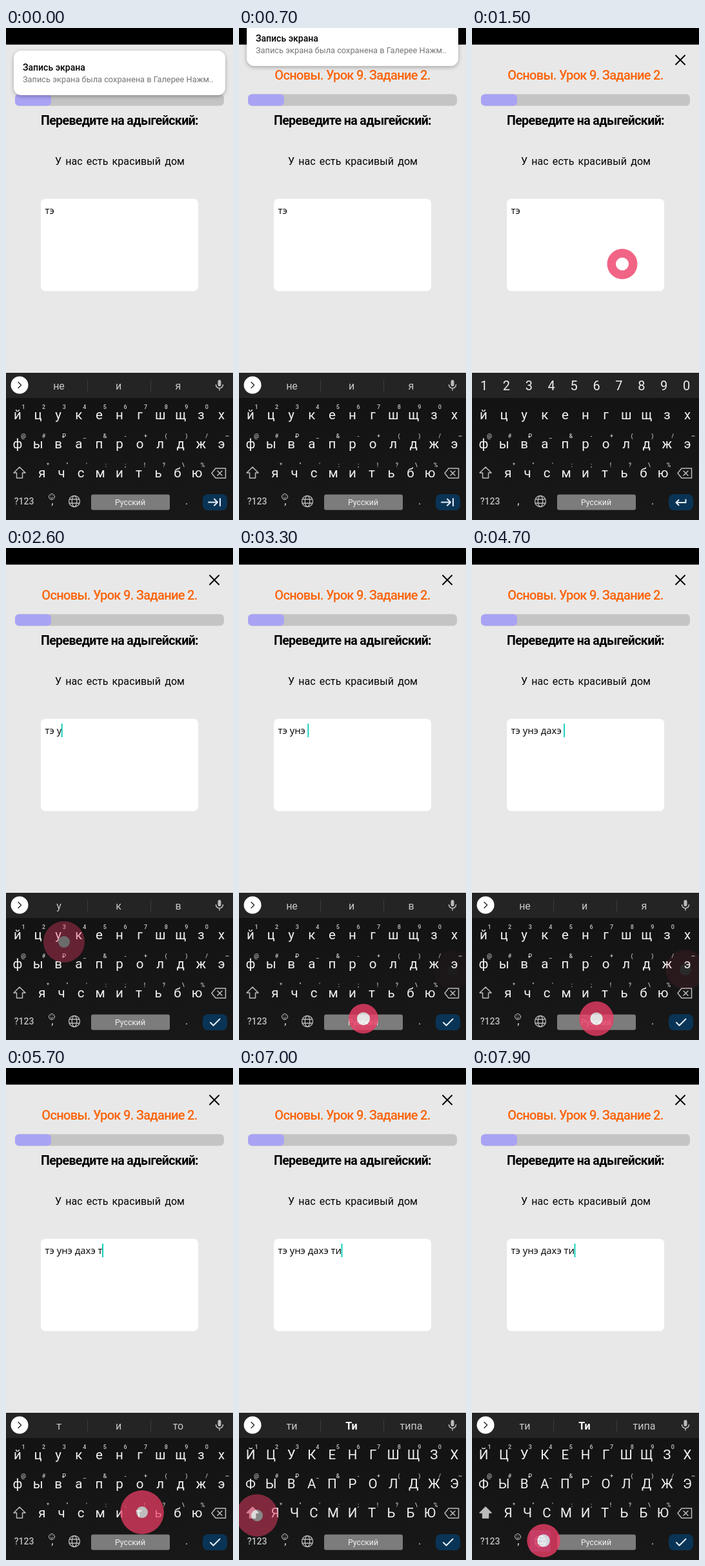
Recreate the animation shown at these times as an HTML page. Size 352 by 762 pixels, loop 8000 ms.

```html
<!DOCTYPE html>
<html lang="ru">
<head>
<meta charset="utf-8">
<style>
html, body { margin: 0; width: 100%; height: 100%; overflow: hidden; background: #000; }
svg { display: block; width: 100vw; height: 100vh; }
text { font-family: Roboto, "Noto Sans", sans-serif; white-space: pre; }
.mid { text-anchor: middle; }
.app { font-family: "Open Sans", "Noto Sans", sans-serif; }
.line { fill: none; stroke-linecap: round; stroke-linejoin: round; }
</style>
</head>
<body>
<svg id="stage" viewBox="0 0 352 762" xmlns="http://www.w3.org/2000/svg">
  <defs>
    <filter id="shadow" x="-10%" y="-20%" width="120%" height="150%">
      <feDropShadow dx="0" dy="2" stdDeviation="3" flood-opacity=".3"/>
    </filter>
    <linearGradient id="board" x2="0" y2="1">
      <stop stop-color="#121212"/><stop offset="1" stop-color="#181818"/>
    </linearGradient>
  </defs>
  <rect width="352" height="762" fill="#e8e8e8"/>
  <rect width="352" height="25.700"/>
  <path class="line" d="M316 42.500l14 14m0-14l-14 14" stroke="#000" stroke-width="2"/>
  <text class="mid" x="176" y="80" font-size="20" font-weight="500" letter-spacing="-.7" fill="#fb640b">Основы. Урок 9. Задание 2.</text>
  <rect x="14" y="102.500" width="324" height="18" rx="6" fill="#c4c4c4"/>
  <rect x="14" y="102.500" width="56" height="18" rx="6" fill="#a9a3f4"/>
  <text class="mid" x="176" y="150" font-size="19.500" font-weight="700" letter-spacing="-.6">Переведите на адыгейский:</text>
  <text class="mid" x="176.500" y="212" font-size="16" letter-spacing=".1" word-spacing="2">У нас есть красивый дом</text>
  <rect x="54" y="264.500" width="244" height="143" rx="7" fill="#fff"/>
  <text id="answer" class="app" x="60.500" y="288" font-size="14.900"></text>
  <rect id="caret" y="272" width="2" height="21" fill="#16d0bd"/>

  <rect y="534" width="352" height="228" fill="url(#board)"/>
  <rect y="534" width="352" height="39" fill="#242424"/>
  <g id="numbers" class="mid" fill="#eee" font-size="20"></g>
  <g id="hints">
    <circle cx="21" cy="553" r="13.500" fill="#fff"/>
    <path class="line" d="M19 548.500l4.500 4.500l-4.500 4.500" stroke="#333" stroke-width="1.600"/>
    <path d="M126.500 544v20M224.500 544v20" stroke="#3c3c3c"/>
    <rect x="328.500" y="545" width="5" height="10" rx="2.500" fill="#bbb"/>
    <path class="line" d="M325.500 552.500a5.500 5.500 0 0 0 11 0M331 558v3" stroke="#bbb" stroke-width="1.500"/>
    <g id="words" class="mid" fill="#c8c8c8" font-size="16"></g>
  </g>
  <g id="keys" class="mid" fill="#f2f2f2" font-size="20.500"></g>
  <g id="marks" class="mid" fill="#c8c8c8" font-size="9" font-weight="500"></g>
  <path id="shift" class="line" d="M21 680l9 9h-4.500v8h-9v-8h-4.500z" stroke="#bbb" stroke-width="1.500"/>
  <path class="line" d="M325 682h15.500v15h-15.500l-6-7.500zM328 686l7 7m0-7l-7 7" stroke="#bbb" stroke-width="1.500"/>
  <text class="mid" x="28" y="738" font-size="14" font-weight="500" fill="#bbb">?123</text>
  <text class="mid" x="72" y="738" font-size="17" fill="#ddd">,</text>
  <g id="smile" class="line" stroke="#ccc">
    <circle cx="71" cy="726" r="4.500"/>
    <path d="M69 727.500q2 2.500 4 0M69.500 724.500v.2M72.500 724.500v.2"/>
  </g>
  <rect id="pressed" x="90" y="716" width="32" height="33" rx="3" fill="#4a5fb0" opacity=".6"/>
  <g class="line" stroke="#bbb" stroke-width="1.300">
    <circle cx="106" cy="733" r="8.500"/>
    <ellipse cx="106" cy="733" rx="3.700" ry="8.500"/>
    <path d="M98.500 730h15M98.500 736h15"/>
  </g>
  <rect x="132" y="722.500" width="122" height="24" rx="3" fill="#7c7c7c"/>
  <text class="mid" x="192.500" y="739" font-size="12.200" fill="#f2f2f2">Русский</text>
  <text class="mid" x="280" y="738" font-size="16" fill="#ddd">.</text>
  <rect x="305" y="722" width="38" height="25" rx="8" fill="#0a3455"/>
  <path id="action" class="line" stroke="#e4eef8" stroke-width="2"/>

  <g id="touches"></g>
  <g id="notice">
    <rect x="12" y="35" width="328" height="69" rx="12" fill="#fff" filter="url(#shadow)"/>
    <text x="26" y="66" font-size="14" font-weight="500">Запись экрана</text>
    <text x="26" y="84" font-size="12.800" fill="#757575">Запись экрана была сохранена в Галерее Нажм..</text>
  </g>
</svg>
<script>
const LOOP = 8000, FOCUS = 1590, BLUR = 900, SHIFT = 6830, GLOBE = 7865;
const $ = id => document.getElementById(id);

function add(parent, tag, attrs, content = "") {
  const node = document.createElementNS("http://www.w3.org/2000/svg", tag);
  for (const name in attrs) node.setAttribute(name, attrs[name]);
  node.textContent = content;
  return parent.appendChild(node);
}
const show = (node, visible) => node.setAttribute("display", visible ? "inline" : "none");

const rows = [
  { letters: "йцукенгшщзх", marks: "1234567890", x: 18, step: 31.6, y: 605.5 },
  { letters: "фывапролджэ", marks: "@#₽_&-+()/~", x: 18, step: 31.6, y: 650.5 },
  { letters: "ячсмитьбю", marks: "*\"':;!?\\%", x: 56, step: 30, y: 695.5 }
];
const letterKeys = [];
const digitMarks = add($("marks"), "g", {});
rows.forEach((row, r) => {
  [...row.letters].forEach((letter, i) => {
    const x = row.x + i * row.step;
    letterKeys.push([add($("keys"), "text", { x, y: row.y }), letter]);
    const mark = row.marks[i];
    if (mark) add(r ? $("marks") : digitMarks, "text", { x: x + 9, y: row.y - 15.5 }, mark);
  });
});
[..."1234567890"].forEach((n, i) => add($("numbers"), "text", { x: 18.5 + i * 34.9, y: 561 }, n));
const words = [82, 174.5, 267].map(x => add($("words"), "text", { x, y: 560 }));

// time, x, y, typed character, suggestions after it
const taps = [
  [1477, 233, 365.5],
  [2390, 90, 610, "у", "у к в"],
  [2680, 180, 606, "н", "ун уна уни"],
  [2980, 331, 653, "э", "унэ уне уже"],
  [3280, 193, 729, " ", "не и в"],
  [3570, 268, 650, "д", "д да до"],
  [3830, 124, 657, "а", "да дай даже"],
  [4073, 331, 608, "х", "да дахэ даже"],
  [4400, 331, 653, "э", "дахэ дахе даже"],
  [4660, 193, 729, " ", "не и я"],
  [5605, 211, 688, "т", "т и то"],
  [5940, 180, 690, "и", "ти Ти типа"],
  [6370, 112, 731],
  [SHIFT, 28, 693],
  [GLOBE, 111, 732]
];
const caretOff = [[2090, 2385], [5260, 5605], [6450, 6880], [7450, 7880]];
const actions = {
  tab: "M314 734.500h14m-5-5l5 5l-5 5M332 729v11",
  enter: "M331.500 730.500v4.500h-15m4-4l-4 4l4 4",
  check: "M317 735l4.500 4.500l10-10"
};

const spots = taps.map(([start, x, y]) => {
  const group = add($("touches"), "g", { transform: `translate(${x} ${y})` });
  const disc = add(group, "circle", { fill: "#ee3d66" });
  const dot = add(group, "circle", { fill: "#fff" });
  return { start, group, disc, dot };
});
const clamp = v => Math.max(0, Math.min(1, v));

function drawSpot({ start, group, disc, dot }, t) {
  const age = t - start;
  const grow = clamp(age / 80), fade = clamp((age - 90) / 240);
  show(group, age >= 0 && fade < 1);
  disc.setAttribute("r", 19 + 15 * grow - 4 * fade);
  dot.setAttribute("r", 10.5 - 1.5 * grow);
  group.setAttribute("opacity", (0.82 - 0.08 * grow) * (1 - fade));
}

function draw(t) {
  const slide = clamp((t - 450) / 400);
  $("notice").setAttribute("transform", `translate(0 ${-115 * slide * slide})`);
  show($("notice"), slide < 1);

  const numeric = t >= BLUR && t < FOCUS;
  show($("numbers"), numeric);
  for (const node of [$("hints"), digitMarks, $("smile")]) show(node, !numeric);
  $("action").setAttribute("d", actions[numeric ? "enter" : t < BLUR ? "tab" : "check"]);

  let answer = "тэ ", hint = "не и я";
  for (const [start, , , letter, next] of taps) {
    if (!letter || t < start) continue;
    answer += letter;
    hint = next;
  }
  $("answer").textContent = answer;
  $("caret").setAttribute("x", 60 + $("answer").getComputedTextLength());
  show($("caret"), t >= FOCUS && !caretOff.some(([from, to]) => t >= from && t < to));

  hint.split(" ").forEach((word, i) => {
    const bold = word === "Ти";
    words[i].textContent = word;
    words[i].setAttribute("font-weight", bold ? 700 : 400);
    words[i].setAttribute("fill", bold ? "#fff" : "#c8c8c8");
  });

  const upper = t >= SHIFT;
  for (const [node, letter] of letterKeys) node.textContent = upper ? letter.toUpperCase() : letter;
  $("shift").style.fill = upper ? "#bbb" : "none";
  show($("pressed"), t >= GLOBE);
  spots.forEach(spot => drawSpot(spot, t));
}

const origin = performance.now();
function tick() {
  draw((performance.now() - origin) % LOOP);
  requestAnimationFrame(tick);
}
tick();
</script>
</body>
</html>
```
